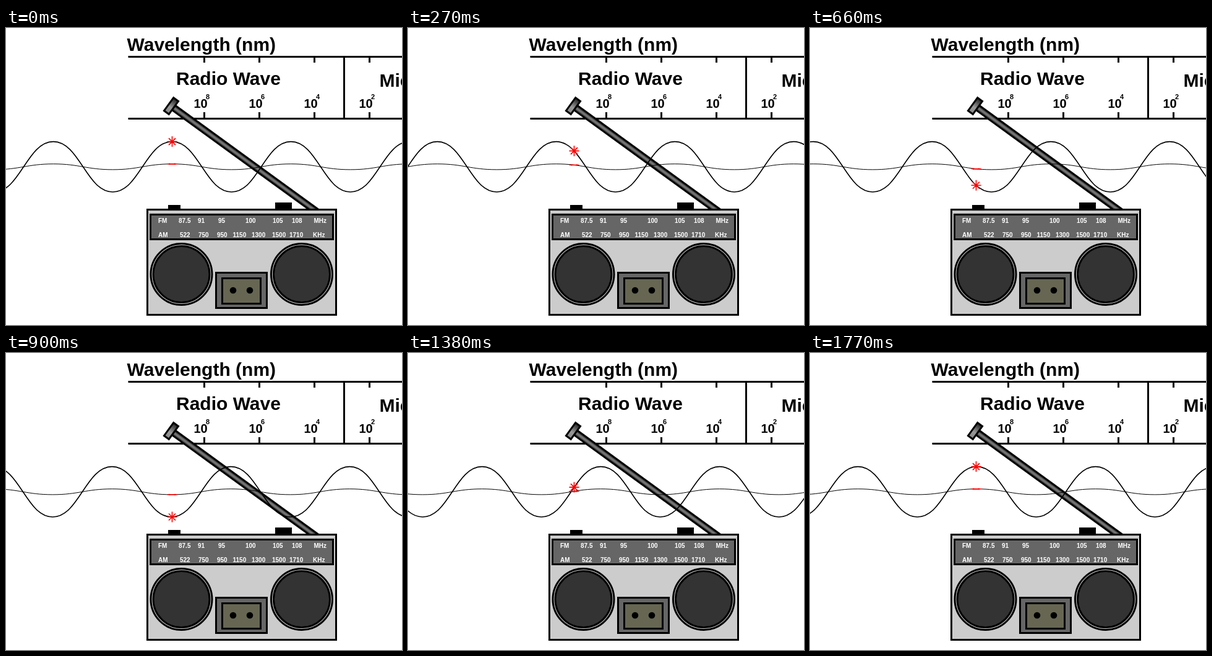
An HTML page that plays this animation: 640x480 px, repeating every 1.8 s.

```html
<!DOCTYPE html>
<html lang="en">
<head>
<meta charset="utf-8">
<title>Radio wave</title>
<style>
html, body { margin: 0; width: 100%; height: 100%; overflow: hidden; background: #fff; }
svg { display: block; width: 640px; height: 480px; }
text { font-family: "Liberation Sans", Arial, sans-serif; font-weight: bold; }
.big { font-size: 30px; }
.power { font-size: 20px; }
.sup { font-size: 11px; }
.dial { font-size: 10px; fill: #fff; }
.line { stroke: #000; stroke-width: 3; }
.wave, .star { fill: none; vector-effect: non-scaling-stroke; }
.wave { stroke: #000; }
.star { stroke: #f00; }
</style>
</head>
<body>
<svg viewBox="0 0 640 480">
  <defs>
    <linearGradient id="rod" x1="0" y1="0" x2="0" y2="1">
      <stop offset="0" stop-color="#1a1a1a"/>
      <stop offset=".5" stop-color="#808080"/>
      <stop offset="1" stop-color="#1a1a1a"/>
    </linearGradient>
    <linearGradient id="tip" x1="0" y1="0" x2="0" y2="1">
      <stop offset="0" stop-color="#222"/>
      <stop offset=".6" stop-color="#999"/>
      <stop offset="1" stop-color="#888"/>
    </linearGradient>
  </defs>

  <text class="big" x="195.500" y="37">Wavelength (nm)</text>
  <text class="big" x="275" y="91.500">Radio Wave</text>
  <text class="big" x="603.500" y="95">Microwave</text>
  <path class="line" d="M197.500 46.500H640M197.500 146.500H640M546.500 46V147"/>
  <g id="scale"></g>

  <g class="line" transform="translate(267 126) rotate(36)">
    <rect x="4" y="-4.500" width="290" height="9" fill="url(#rod)"/>
    <rect x="-4.800" y="-13" width="9.600" height="26" fill="url(#tip)"/>
  </g>

  <path d="M262 286h20v8h-20zM435 282h27v12h-27z"/>
  <g class="line">
    <rect x="228.500" y="293.500" width="305" height="170" fill="#ccc"/>
    <rect x="233.500" y="301.500" width="295" height="40" fill="#666"/>
    <g id="speakers"></g>
    <rect x="339.500" y="395.500" width="82" height="57" fill="#666"/>
    <rect x="349.500" y="404.500" width="62" height="41" fill="#666653"/>
  </g>
  <circle cx="367" cy="424" r="5.300"/>
  <circle cx="394" cy="424" r="5.300"/>
  <g id="dial"></g>
  <g id="waves"></g>
</svg>
<script>
const $ = id => document.getElementById(id);
const LENGTH = 192, HALF = LENGTH / 2, AMP = 40.7, HANDLE = 0.44;
const PEAK = 76.5, MARK = 268.5, MIDDLE = 224.3;
const FRAME = 30, FRAMES = 60, STEP = 191 / 59;

$("scale").innerHTML = [8, 6, 4, 2].map((n, i) => {
  const x = 320.5 + 89 * i;
  return `<path class="line" d="M${x} 46v10M${x} 136v10"/>
    <text class="power" x="${x - 17}" y="129">10</text>
    <text class="sup" x="${x + 2.5}" y="115">${n}</text>`;
}).join("");

$("speakers").innerHTML = [283.5, 478].map(x =>
  `<circle cx="${x}" cy="398" r="49.5" fill="#ccc"/>
   <circle cx="${x}" cy="398" r="45.5" fill="#333"/>`).join("");

const row = (y, labels) => Object.entries(labels).map(([label, x]) =>
  `<text class="dial" x="${x}" y="${y}">${label}</text>`).join("");
$("dial").innerHTML =
  row(315, { FM: 246, "87.5": 279, 91: 310, 95: 343, 100: 387, 105: 431, 108: 462, MHz: 497.5 }) +
  row(338, { AM: 246, 522: 281, 750: 311, 950: 341, 1150: 366.5, 1300: 397, 1500: 430, 1710: 458, KHz: 496 });

const reach = HALF * HANDLE, rest = HALF - reach, drop = 2 * AMP;
const period = `c${reach} 0 ${rest} ${drop} ${HALF} ${drop}s${rest} ${-drop} ${HALF} ${-drop}`;
const curve = `M${PEAK - LENGTH} ${-AMP}` + period.repeat(5);
const wave = (scale, line, red) =>
  `<g transform="translate(0 ${MIDDLE}) scale(1 ${scale})">
    <path class="wave" stroke-width="${line}" d="${curve}"/>
    <path class="star" stroke-width="${red}" d="M-8 0H8M0 -8.500V8.500M-5.500 -5.500L5.500 5.500M-5.500 5.500L5.500 -5.500"/>
  </g>`;
$("waves").innerHTML = wave(1, 1.6, 1.6) + wave(0.113, 1, 1.2);
const curves = document.querySelectorAll(".wave");
const stars = document.querySelectorAll(".star");

// Height of the curve at a distance from a crest, found by bisection
function heightAt(distance) {
  const d = distance % LENGTH;
  const s = Math.min(d, LENGTH - d) / HALF;
  let low = 0, high = 1;
  for (let i = 0; i < 24; i++) {
    const t = (low + high) / 2, u = 1 - t;
    const x = 3 * HANDLE * t * u * u + 3 * (1 - HANDLE) * t * t * u + t ** 3;
    if (x < s) low = t; else high = t;
  }
  return AMP * (2 * low * low * (3 - 2 * low) - 1);
}

function draw(now) {
  const shift = Math.floor(now / FRAME) % FRAMES * STEP;
  const y = heightAt(shift);
  curves.forEach(c => c.setAttribute("transform", `translate(${-shift} 0)`));
  stars.forEach(s => s.setAttribute("transform", `translate(${MARK} ${y})`));
}

const start = performance.now();
function tick() {
  draw(performance.now() - start);
  requestAnimationFrame(tick);
}
tick();
</script>
</body>
</html>
```
